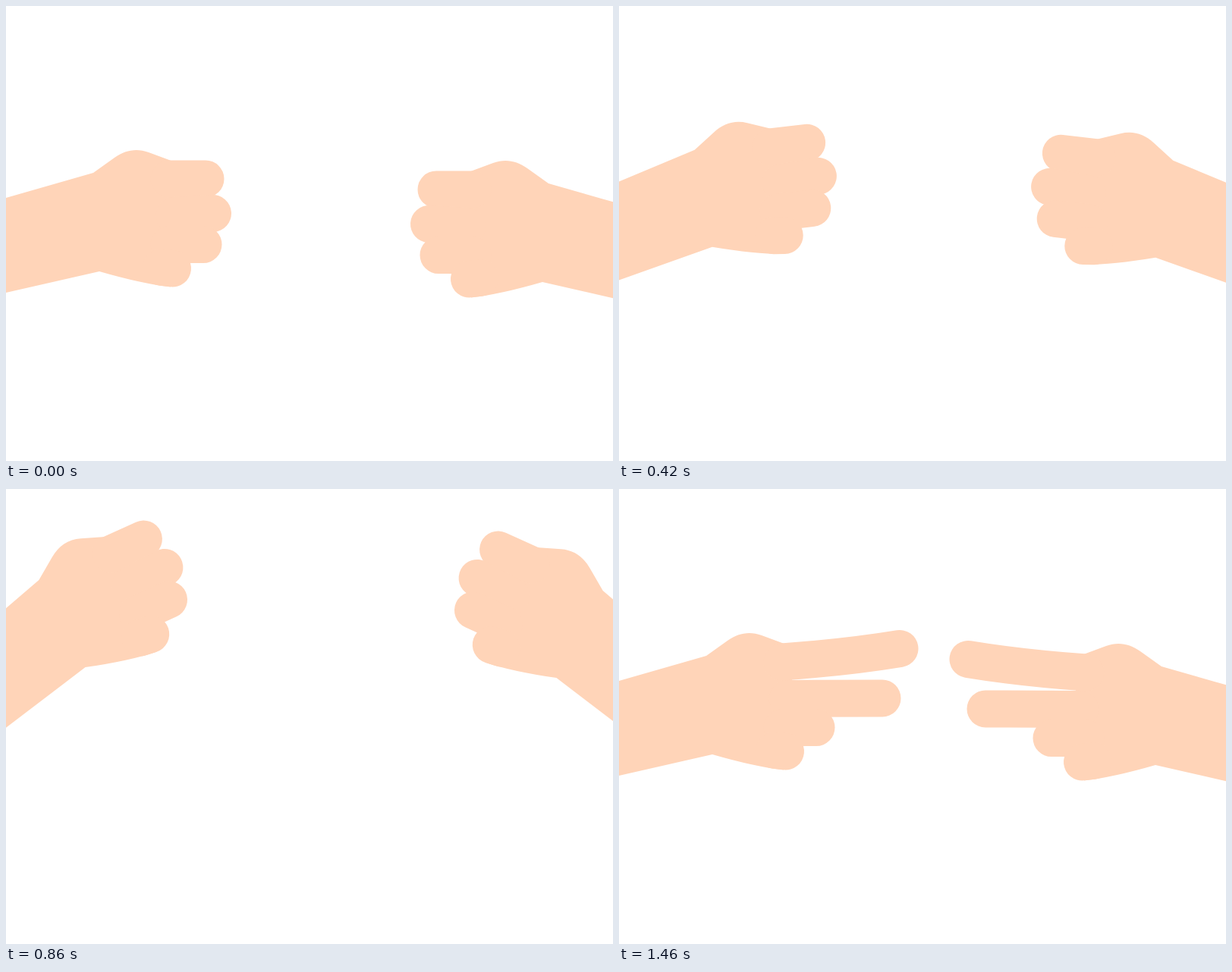
Write an HTML page that moves like this. It is 800 by 600 pixels and loops after 1.48 s.

```html
<!DOCTYPE html>
<html lang="en">
<head>
<meta charset="utf-8">
<title>Rock paper scissors</title>
<style>
  html, body { margin: 0; width: 100%; height: 100%; overflow: hidden; background: #fff; }
  svg { display: block; width: 100%; height: 100%; }
  .finger { fill: none; stroke: #ffd4b8; stroke-width: 49; stroke-linecap: round; }
</style>
</head>
<body>
<svg viewBox="0 0 800 600">
  <defs>
    <g id="hand">
      <path fill="#ffd4b8" d="M-300 339 L115 220 L143 200 C157 190 172 187 188 193
        L215 203 L222 206 L228 228 V340 L217 370.4 Q180 366.5 123 350 L-300 446.3 Z"/>
      <path class="finger" id="index"/>
      <path class="finger" id="middle"/>
      <path class="finger" d="M215 314.5 H260"/>
      <path class="finger" d="M205 344.5 L219.5 346"/>
    </g>
  </defs>
  <use href="#hand"/>
  <use href="#hand" transform="translate(830 14) scale(-1 1)"/>
</svg>
<script>
  const LOOP = 1480, STEP = 20;
  const ELBOW = [-151, 335];
  const hand = document.getElementById('hand');
  const index = document.getElementById('index');
  const middle = document.getElementById('middle');

  const rise = u => 1 - (1 - u) ** 3;
  const fall = u => u * u;
  const settle = u => 1 - (1 - u) ** 2;

  // time, arm angle, easing used to get there
  const swing = [
    [0, 0],
    [170, -9.1, rise],
    [340, 8, fall],
    [508, -9.2, rise],
    [680, 7.7, fall],
    [920, -25, rise],
    [1154, 4.1, fall],
    [1460, 0, settle]
  ];

  function armAngle(t) {
    for (let i = 1; i < swing.length; i++) {
      const [t0, a0] = swing[i - 1], [t1, a1, ease] = swing[i];
      if (t <= t1) return a0 + (a1 - a0) * ease((t - t0) / (t1 - t0));
    }
    return 0;
  }

  // blends closed to open; the bump bends the finger on the way
  function blend(closed, open, bump, e) {
    return closed.map((c, i) => c + (open[i] - c) * e + bump[i] * 4 * e * (1 - e));
  }

  function setFinger(el, start, [cx, cy, x, y]) {
    el.setAttribute('d', `M${start} Q${cx} ${cy} ${x} ${y}`);
  }

  function draw(t) {
    const e = fall(Math.min(1, Math.max(0, (t - 950) / 210)));
    setFinger(index, '215 228',
      blend([240, 228, 263, 228], [300, 222, 370, 210.5], [-6, -3.5, 0, 8], e));
    setFinger(middle, '222 276.5',
      blend([247, 275, 272.5, 273.5], [285, 276.5, 347, 276], [0, -3, 0, 3.5], e));
    hand.setAttribute('transform', `rotate(${armAngle(t)} ${ELBOW})`);
  }

  const start = performance.now();
  function tick(now) {
    const t = Math.max(0, now - start) % LOOP;
    draw(Math.floor(t / STEP) * STEP);
    requestAnimationFrame(tick);
  }
  draw(0);
  requestAnimationFrame(tick);
</script>
</body>
</html>
```
